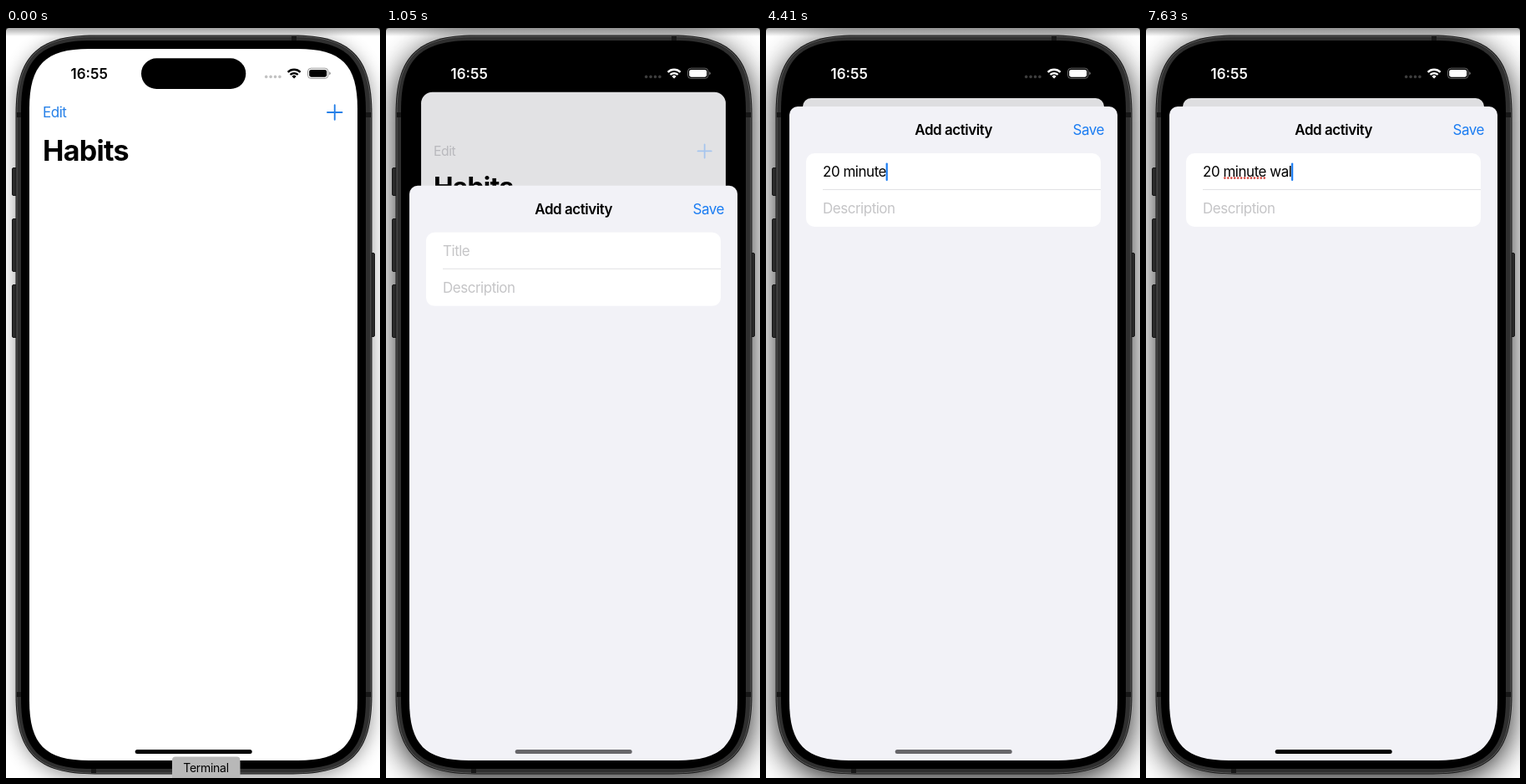
Write an HTML page that moves like this. It is 448 px wide and 898 px high and loops after 8 s.

```html
<!DOCTYPE html>
<html lang="en">
<head>
<meta charset="utf-8">
<title>Habits</title>
<style>
  html, body { margin: 0; width: 100%; height: 100%; overflow: hidden; background: #fff; }
  svg { display: block; width: 448px; height: 898px; }
  text {
    font: 400 17px Inter, "Liberation Sans", sans-serif;
    font-optical-sizing: none;
    letter-spacing: -.028em;
    white-space: pre;
  }
  .large { font-size: 34px; font-weight: 700; letter-spacing: -.02em; }
  .semi { font-weight: 600; }
  .mid { text-anchor: middle; }
  .end { text-anchor: end; }
  .hint { fill: #c5c5c7; }
  .blue { fill: #1a7cf2; }
  #clock { letter-spacing: 0; }
  #tip text { font-size: 14px; letter-spacing: -.02em; }
</style>
</head>
<body>
<svg viewBox="0 0 448 898">
  <defs>
    <clipPath id="screen"><path data-box="28 25 393 852 55"/></clipPath>
    <linearGradient id="topShade" x2="0" y2="1">
      <stop stop-color="#000" stop-opacity=".34"/>
      <stop offset="1" stop-color="#000" stop-opacity="0"/>
    </linearGradient>
  </defs>

  <rect width="448" height="898" fill="#fff"/>
  <rect id="shadow" x="12" width="426" height="884" rx="75"/>
  <rect x="0" width="448" height="10" fill="url(#topShade)"/>
  <path d="M0 0h4Q0 0 0 4zM448 0h-4q4 0 4 4z" fill="#222"/>

  <g fill="#2b2b2b" stroke="#161616">
    <rect x="7.5" y="167.5" width="7" height="33" rx="1.5"/>
    <rect x="7.5" y="228.5" width="7" height="63" rx="1.5"/>
    <rect x="7.5" y="307.5" width="7" height="63" rx="1.5"/>
    <rect x="434.5" y="269.5" width="7" height="100" rx="1.5"/>
  </g>
  <path data-box="11.5 8.5 427 885 73" fill="#161616"/>
  <path data-box="13 10 424 882 71.5" fill="#2f2f2f" stroke="#6a6a6a" stroke-width=".8"/>
  <path d="M13 101h6v6h-6zM13 795h6v6h-6zM431 101h6v6h-6zM431 795h6v6h-6zM342 10h6v6h-6zM102 886h6v6h-6z" fill="#171717"/>
  <path data-box="18 15 413 872 65"/>

  <g clip-path="url(#screen)">
    <g id="home">
      <rect id="page" width="393" height="852"/>
      <text id="edit" x="16" y="82">Edit</text>
      <path id="plus" d="M357 76h17.5M365.75 67.25v17.5" stroke-width="1.9" stroke-linecap="round"/>
      <text class="large" x="16" y="134">Habits</text>
    </g>

    <g id="status">
      <text id="clock" class="semi mid" x="99.7" y="60.5">16:55</text>
      <g opacity=".24">
        <circle cx="311.7" cy="58.4" r="1.8"/><circle cx="317.1" cy="58.4" r="1.8"/>
        <circle cx="322.5" cy="58.4" r="1.8"/><circle cx="327.9" cy="58.4" r="1.8"/>
      </g>
      <g fill="none" stroke="currentColor" stroke-width="2.3">
        <path d="M337.6 52.8a10.8 10.8 0 0 1 15 0M340.5 55.9a6.6 6.6 0 0 1 9.2 0"/>
      </g>
      <path d="M345.1 60.6l-2.6-2.7a3.7 3.7 0 0 1 5.2 0z"/>
      <rect x="361.5" y="48.2" width="24.4" height="12.2" rx="3.8" fill="none" stroke="currentColor" stroke-opacity=".4"/>
      <rect x="363.2" y="49.9" width="21" height="8.8" rx="2.4"/>
      <path d="M387.2 52.3q1.6 .6 1.6 2t-1.6 2z" opacity=".45"/>
    </g>

    <g id="sheet">
      <rect x="28" y="94" width="393" height="850" rx="10" fill="#f2f2f7"/>
      <text class="semi mid" x="224.7" y="128">Add activity</text>
      <text class="blue end" x="405" y="128">Save</text>
      <rect x="48" y="150" width="353" height="88" rx="10" fill="#fff"/>
      <path d="M68 193.5h333" stroke="#e2e2e4"/>
      <text id="title" x="68" y="178"></text>
      <text class="hint" x="68" y="222">Description</text>
      <path id="squiggle" d="M94.4 179.6h49.6" stroke="#d5483f" stroke-width="2.7" stroke-linecap="round" stroke-dasharray="0 3.95"/>
      <rect id="caret" class="blue" y="161.5" width="2.2" height="21.5" rx="1"/>
      <g id="bubble">
        <rect id="mark" y="161" height="22" rx="3" fill="#1a7cf2" opacity=".16"/>
        <rect id="card" y="187" height="29" rx="7" fill="#fff" style="filter:drop-shadow(0 1px 2px #0004)"/>
        <text id="guess" class="blue" y="207"></text>
        <path id="cross" d="M0 198l6 6m0-6l-6 6" stroke="#9a9a9e" stroke-width="1.4" stroke-linecap="round"/>
      </g>
    </g>
  </g>

  <rect x="162" y="36.3" width="125.3" height="36.7" rx="18.3"/>
  <rect id="bar" x="154.7" y="864" width="140" height="5" rx="2.5"/>
  <g id="tip">
    <rect x="199" y="872.5" width="81.5" height="30" rx="4" fill="#b8b8b8"/>
    <text class="mid" x="239.5" y="891">Terminal</text>
  </g>
</svg>
<script>
const LOOP = 8000, TICK = 70, OPEN = 770, SETTLED = 1400;
const $ = id => document.getElementById(id);
const set = (id, attrs) => {
  for (const name in attrs) $(id).setAttribute(name, attrs[name]);
};
const mix = (a, b, p) => a + (b - a) * p;

// Last value whose start time has passed.
const at = (steps, t) => {
  let value = steps[0][1];
  for (const [start, v] of steps) if (t >= start) value = v;
  return value;
};

const fade = (start, ...values) => values.map((v, i) => [start + i * TICK, v]);
const TIP = [[0, 1], ...fade(140, .75, .5, .25, 0)];
const CARET = [
  [0, 0], [1750, 1], ...fade(2380, .65, .3, 0), ...fade(2730, .35, .7, 1),
  ...fade(5390, .65, .3, 0), ...fade(5740, .35, .7, 1),
  ...fade(6440, .45, 0), ...fade(6650, .5, 1)
];
const BUBBLE = [
  [0, 0], [4620, 1], ...fade(6020, .65, .3, 0), ...fade(7420, .6, 1), [7630, 0]
];
const TYPED = [
  [0, 0], [3010, 2], [3430, 3], [3640, 4], [3850, 5], [3990, 6], [4130, 7],
  [4270, 8], [4410, 9], [6650, 10], [7140, 11], [7420, 12], [7630, 13]
];
const PHRASE = "20 minute wal";

// Rectangle with smooth, slightly extended corners.
function smoothBox(x, y, w, h, r) {
  const e = r * 1.3, c = r * .348, R = x + w, B = y + h;
  return `M${x} ${y + e}C${x} ${y + c} ${x + c} ${y} ${x + e} ${y}H${R - e}` +
    `C${R - c} ${y} ${R} ${y + c} ${R} ${y + e}V${B - e}` +
    `C${R} ${B - c} ${R - c} ${B} ${R - e} ${B}H${x + e}` +
    `C${x + c} ${B} ${x} ${B - c} ${x} ${B - e}Z`;
}
for (const path of document.querySelectorAll("[data-box]"))
  path.setAttribute("d", smoothBox(...path.dataset.box.split(" ").map(Number)));

// Critically damped spring: share of the way still to go.
function remaining(t) {
  if (t >= SETTLED) return 0;
  const x = Math.max(0, t - 831) * .01666;
  return (1 + x) * Math.exp(-x);
}

function drawHome(t, p) {
  const open = t >= OPEN, moving = t > OPEN;
  const scale = mix(1, 361 / 393, p);
  set("home", { transform: `translate(${mix(28, 44, p)} ${mix(25, 84, p)}) scale(${scale})` });
  const grey = mix(255, 224, p);
  set("page", { rx: mix(40, 11, p), fill: `rgb(${grey - 2 * p},${grey - 2 * p},${grey})` });
  set("edit", { fill: moving ? "#b9b9bd" : "#2680e8" });
  set("plus", { stroke: open ? "#a6c5ee" : "#2680e8" });
  const ink = t >= 1050 ? "#fff" : "#000";
  set("status", { fill: ink, color: ink });
  set("bar", { fill: moving && t < 4830 ? "#67666a" : "#000" });
  $("shadow").style.filter = `blur(${open ? 18 : 11}px)`;
  set("shadow", { y: open ? 17 : 13, opacity: open ? .85 : .4 });
}

function drawField(t) {
  const count = at(TYPED, t), title = $("title");
  title.textContent = count ? PHRASE.slice(0, count) : "Title";
  title.setAttribute("class", count ? "" : "hint");
  const width = count ? title.getComputedTextLength() : 0;
  set("caret", { x: 67.6 + width, opacity: at(CARET, t) });
  set("squiggle", { opacity: count > 9 ? 1 : 0 });

  const second = t >= 7000, left = second ? 149 : 93, room = second ? 32 : 64;
  set("bubble", { opacity: at(BUBBLE, t) });
  set("mark", { x: left - 1, width: Math.max(0, 70 + width - left) });
  set("card", { x: left - 11, width: room + 22 });
  set("guess", { x: left });
  $("guess").textContent = second ? "va" : "minuta";
  set("cross", { transform: `translate(${left + room - 5} 0)` });
}

function draw(now) {
  const t = Math.floor((now % LOOP) / TICK + 1e-6) * TICK;
  const left = remaining(t);
  drawHome(t, 1 - left);
  set("sheet", { transform: `translate(0 ${784 * left})` });
  drawField(t);
  set("tip", { opacity: at(TIP, t) });
}

const begin = performance.now();
function tick() {
  draw(performance.now() - begin);
  requestAnimationFrame(tick);
}
tick();
</script>
</body>
</html>
```
